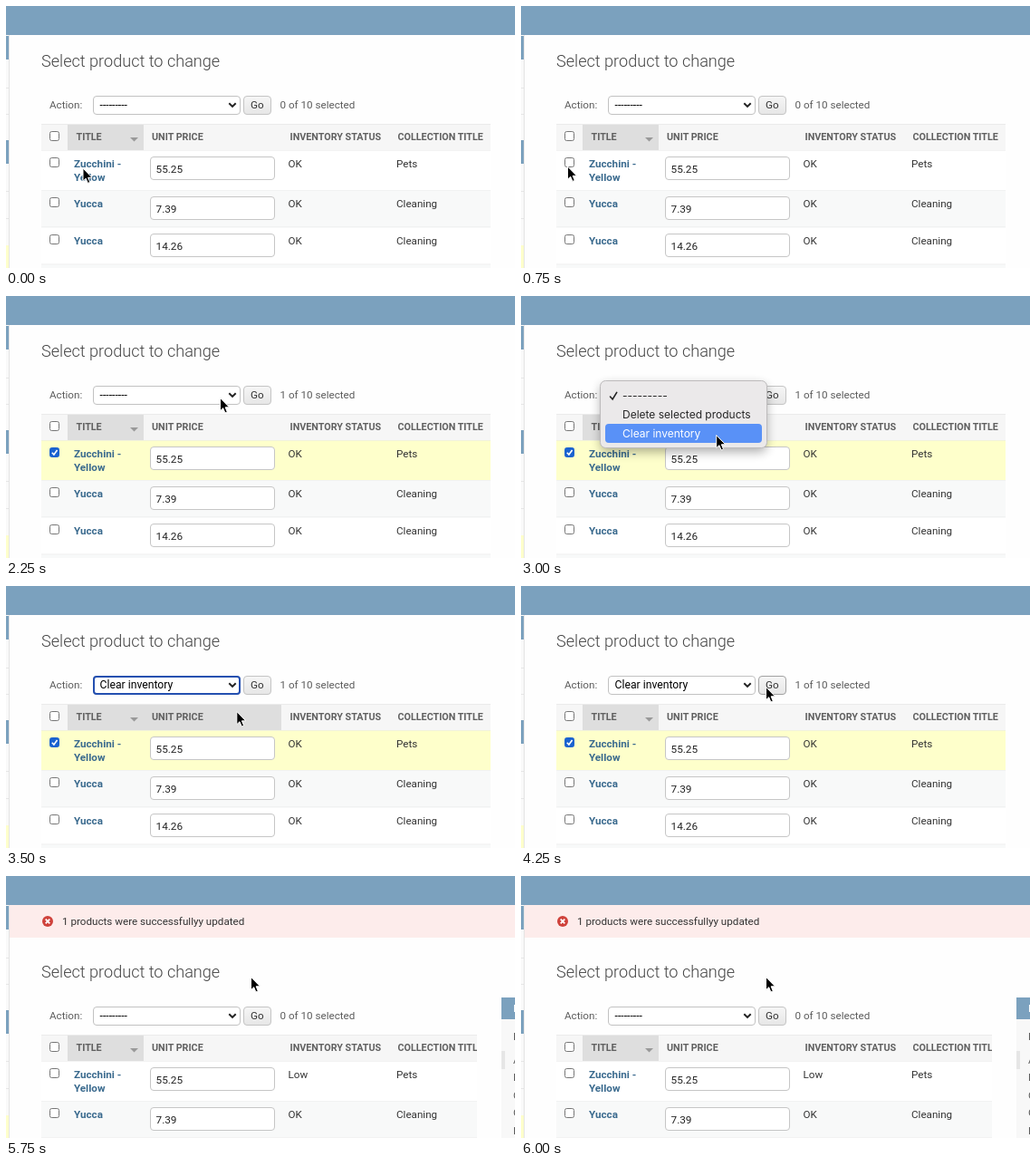
These frames come from a looping animation (562 by 289 pixels, 6250 ms). An HTML page:

```html
<!DOCTYPE html>
<html lang="en">
<head>
<meta charset="utf-8">
<title>Select product to change</title>
<style>
html, body { margin: 0; width: 100%; height: 100%; overflow: hidden; background: #fff; }
svg { display: block; width: 562px; height: 289px; }
text { font: 11.65px Roboto, sans-serif; fill: #333; white-space: pre; }
.title { font-size: 18.1px; font-weight: 300; fill: #444; }
.label { fill: #5c5c5c; }
.head { font-size: 10.75px; font-weight: 700; fill: #606060; }
.link { font-weight: 700; fill: #3a6a8e; }
.price { font-size: 11.8px; fill: #222; }
#choice { font-size: 12.2px; fill: #000; }
#menu text { font: 12px Inter, sans-serif; fill: #262626; }
</style>
</head>
<body>
<svg id="stage" viewBox="0 0 562 289" xmlns="http://www.w3.org/2000/svg">
  <defs>
    <linearGradient id="btn" x2="0" y2="1">
      <stop stop-color="#f6f6f6"/><stop offset="1" stop-color="#e6e6e6"/>
    </linearGradient>
    <filter id="shade" x="-20%" y="-30%" width="140%" height="170%"><feGaussianBlur stdDeviation="6"/></filter>
    <clipPath id="clip"><rect id="clipBox" x="39" y="120" width="496" height="180"/></clipPath>
  </defs>
  <rect width="562" height="289" fill="#fefefe"/>
  <g id="side"></g>
  <g id="note">
    <rect x="4" y="32" width="558" height="36" fill="#fdeceb"/>
    <circle cx="46" cy="50" r="6" fill="#cf423b"/>
    <path d="M43.7 47.7l4.6 4.6m0-4.6l-4.6 4.6" stroke="#fff" stroke-width="1.8"/>
    <text x="62" y="54">1 products were successfullyy updated</text>
  </g>
  <g id="page">
    <text class="title" x="39" y="67">Select product to change</text>
    <text class="label" x="48" y="113">Action:</text>
    <rect x="96.5" y="99.5" width="162" height="20" rx="3.5" fill="#fff" stroke="#c2c2c2"/>
    <text id="choice" x="103.6" y="113"></text>
    <path d="M246.3 107.2l3.7 3.7 3.7-3.7" fill="none" stroke="#222" stroke-width="2"/>
    <rect id="ring" x="97" y="100" width="161" height="19" rx="3" fill="none" stroke="#2450b0" stroke-width="2"/>
    <rect id="go" x="262.5" y="99.5" width="30" height="20" rx="3.5" fill="url(#btn)"/>
    <text x="270" y="113">Go</text>
    <text id="count" class="label" x="302.5" y="113"></text>
    <g id="table" clip-path="url(#clip)"></g>
  </g>
  <g id="filter"></g>
  <rect width="562" height="32" fill="#7ba1be"/>
  <g id="menu">
    <rect x="88" y="98" width="183" height="74" rx="6" fill="#000" opacity=".32" filter="url(#shade)"/>
    <rect x="87.5" y="93.5" width="184" height="74" rx="6" fill="#ebe9ea" stroke="#bdbbbc"/>
    <rect id="mark" x="93" width="173" height="21" rx="4" fill="#5991f7"/>
    <path d="M98.5 111l2.6 3 4.6-7.6" fill="none" stroke="#222" stroke-width="1.6" stroke-linecap="round"/>
    <text x="112" y="114">---------</text>
    <text class="item" x="112" y="135">Delete selected products</text>
    <text class="item" x="112" y="156">Clear inventory</text>
  </g>
  <path id="cursor" d="M0 0V14.2L3.2 11.2L5.4 16.4L7.8 15.4L5.6 10.3H10Z" fill="#000" stroke="#fff" stroke-width="1" stroke-linejoin="round"/>
</svg>
<script>
const $ = id => document.getElementById(id);
const rect = (x, y, w, h, fill, more = '') =>
  `<rect x="${x}" y="${y}" width="${w}" height="${h}" fill="${fill}" ${more}/>`;
const text = (x, y, s, cls = '') => `<text x="${x}" y="${y}" class="${cls}">${s}</text>`;
const show = (id, on) => $(id).setAttribute('visibility', on ? 'visible' : 'hidden');

// Sliver of the navigation panel at the left edge
function sideStrip() {
  let s = rect(0, 32, 3, 257, '#f9f9f9');
  for (const y of [90, 119, 204, 234]) s += rect(0, y, 3, 1, '#e6e6e6');
  for (const y of [33, 148]) s += rect(0, y, 3, 26, '#7ba1be');
  return s + rect(0, 264, 3, 25, '#feffcb') + rect(3, 32, 1, 257, '#e4e4e4');
}

function filterPanel() {
  let s = rect(547, 134, 15, 155, '#f8f8f8') + rect(547, 134, 15, 24, '#7ba1be') +
    rect(547, 193, 4, 20, '#e6e6e6');
  s += '<text x="560" y="150" style="fill:#fff">FILTER</text>';
  ['By', 'All', 'Low', 'Clean', 'Gifts', 'Pets'].forEach((w, i) =>
    s += text(560, [181, 207, 226, 246, 265, 285][i], w, 'label'));
  return s;
}

const box = (y, id = '') =>
  rect(48.5, y, 10, 10, '#fff', `rx="2" stroke="#767676" ${id}`);

function row(y, h, fill, name, price, status, group, first) {
  const top = y + 7, base = y + 18.5;
  let s = rect(39, y, 496, h, fill, first ? 'id="row"' : '') + rect(39, y + h - 1, 496, 1, '#ececec');
  s += box(y + 8, first ? 'id="check"' : '');
  name.forEach((n, i) => s += text(75, base + 15 * i, n, 'link'));
  s += rect(159.5, top, 137, 25, '#fff', 'rx="3.5" stroke="#c6c6c6"') + text(165.5, top + 17.5, price, 'price');
  s += `<text x="311.5" y="${base}" ${first ? 'id="status"' : ''}>${status}</text>`;
  return s + text(431, base, group);
}

function tableParts() {
  let s = rect(39, 130, 496, 30, '#f6f6f6') + rect(39, 130, 496, 1, '#ebebeb') +
    rect(68, 131, 84, 28, '#dedede') + rect(152, 131, 152, 28, '#dedede', 'id="hover"') +
    rect(39, 159, 496, 1, '#e8e8e8') + box(138.5);
  const heads = { TITLE: 77.5, 'UNIT PRICE': 161, 'INVENTORY STATUS': 313.5, 'COLLECTION TITLE': 432.5 };
  for (const h in heads) s += text(heads[h], 148, h, 'head');
  s += '<path d="M137 145h9l-4.5 4.5z" fill="#999"/>';
  s += row(159.5, 44.5, '#fff', ['Zucchini -', 'Yellow'], '55.25', 'OK', 'Pets', true);
  s += row(203.5, 41, '#f8f9f9', ['Yucca'], '7.39', 'OK', 'Cleaning');
  s += row(244.5, 41, '#fff', ['Yucca'], '14.26', 'OK', 'Cleaning');
  s += rect(39, 285.5, 496, 10, '#f8f9f9');
  return s + '<path id="tick" d="M50.8 172.8l2.1 2.2 3.6-5" fill="none" stroke="#fff" stroke-width="1.6"/>';
}

$('side').innerHTML = sideStrip();
$('filter').innerHTML = filterPanel();
$('table').innerHTML = tableParts();

// Pointer stops: time, x, y
const path = [
  [0, 85, 179], [250, 61.5, 180], [500, 53.5, 178], [750, 51.5, 177], [1250, 49.5, 175],
  [1500, 49, 174.5], [1750, 165.5, 148], [2000, 221.5, 125], [2250, 236.5, 112.5],
  [2500, 235.5, 124], [2750, 215, 155], [3000, 215.7, 153.5], [3250, 221.5, 153],
  [3500, 254.8, 138.5], [3750, 263, 120], [4000, 270.5, 111.5]
];
const LOOP = 6250;

function draw(t) {
  const within = (a, b) => t >= a && t < b;
  const saved = t >= 4750, checked = within(1500, 4750);
  const [, x, y] = path.filter(p => p[0] <= t).pop();
  $('cursor').setAttribute('transform', `translate(${x} ${y})`);

  $('page').setAttribute('transform', `translate(0 ${saved ? 45 : 0})`);
  $('clipBox').setAttribute('width', saved ? 481 : 496);
  show('note', saved);
  show('filter', saved);
  $('status').textContent = saved ? 'Low' : 'OK';

  $('count').textContent = `${checked ? 1 : 0} of 10 selected`;
  $('row').setAttribute('fill', checked ? '#feffcb' : '#fff');
  $('check').setAttribute('fill', checked ? '#1a62d0' : '#fff');
  $('check').setAttribute('stroke', checked ? '#1a62d0' : within(1250, 1500) ? '#4f4f4f' : '#767676');
  show('tick', checked);

  show('hover', within(1750, 2250) || within(3500, 3750));
  $('go').setAttribute('stroke', within(3750, 4750) ? '#a2a2a2' : '#c4c4c4');
  $('choice').textContent = within(3250, 4750) ? 'Clear inventory' : '---------';
  show('ring', within(3250, 4250));

  // The menu fades out after the choice
  show('menu', within(2500, 3500));
  $('menu').setAttribute('opacity', t < 3250 ? 1 : 0.4);
  const pick = t < 2750 ? 0 : 1;
  $('mark').setAttribute('y', 120 + 21 * pick);
  document.querySelectorAll('.item').forEach((el, i) => el.style.fill = i === pick ? '#fff' : '');
}

const start = performance.now();
function tick() {
  draw((performance.now() - start) % LOOP);
  requestAnimationFrame(tick);
}
tick();
</script>
</body>
</html>
```
